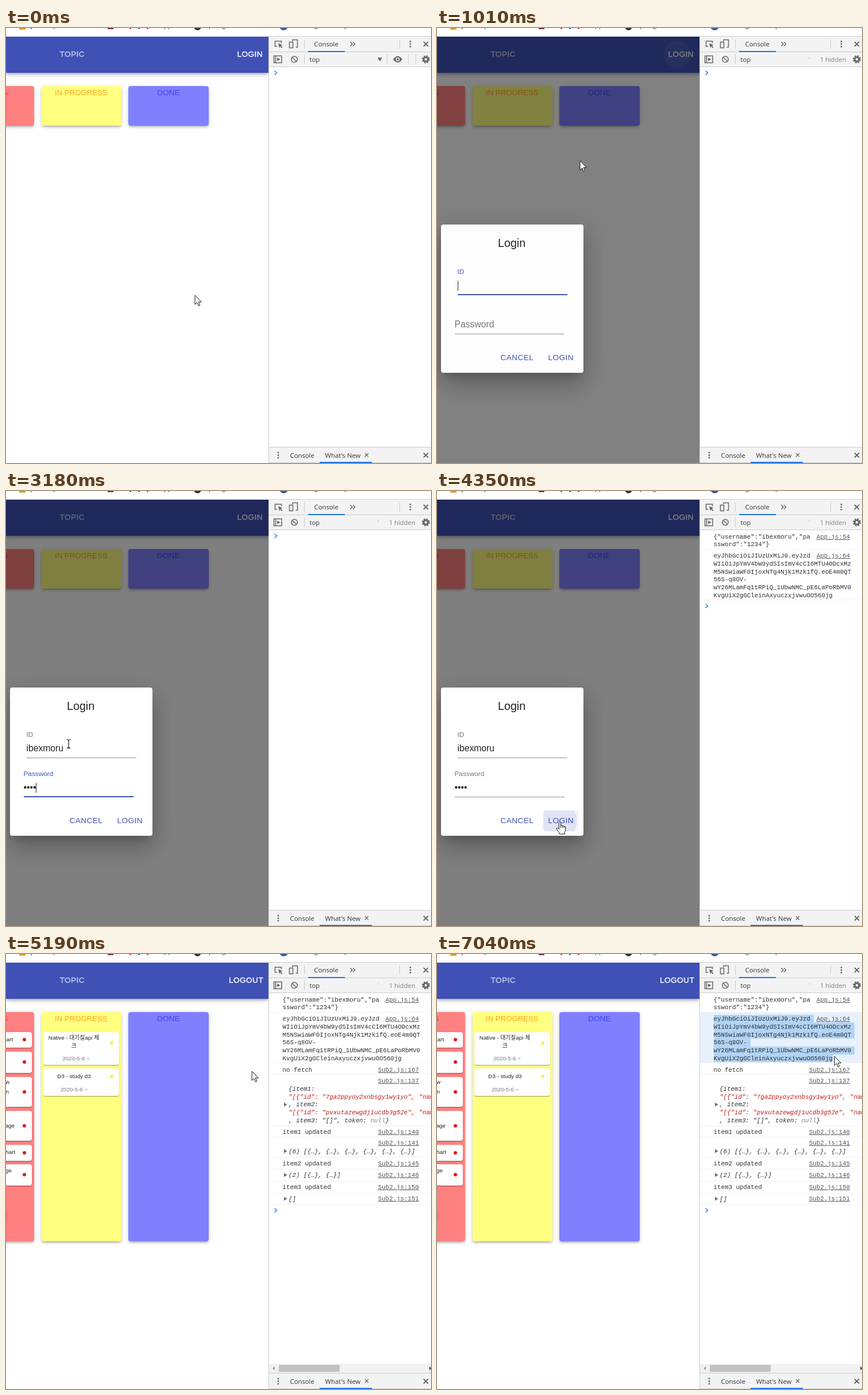
An HTML page for the animation above (8.53 s loop, 740 by 757 pixels).

```html
<!DOCTYPE html>
<html lang="en">
<head>
<meta charset="utf-8">
<title>Board login</title>
<style>
html, body { margin: 0; width: 100%; height: 100%; overflow: hidden; background: #fff; }
#stage { position: fixed; left: 0; top: 0; width: 740px; height: 757px; overflow: hidden;
  font-family: "Liberation Sans", Arial, "Noto Sans CJK KR", "Noto Sans CJK", sans-serif; }
#stage div { position: absolute; box-sizing: border-box; white-space: pre; line-height: 20px; }
#stage svg { position: absolute; left: 0; top: 0; overflow: visible; }
#stage .ui { font-family: "Open Sans", "Noto Sans", sans-serif; color: #333; }
#stage .mono { font: 10.8px/20px "Liberation Mono", "DejaVu Sans Mono", monospace; color: #303030; }
.btn { letter-spacing: .39px; }
.bar { color: #fff; -webkit-text-stroke: .35px #fff; }
.caret { display: inline-block; width: 1px; height: 17px; background: #222; vertical-align: -4px; }
u { color: #545454; }
em b { font-weight: 400; color: #c41a16; }
em s { text-decoration: none; color: #808080; }
</style>
</head>
<body>
<div id="stage"></div>
<script>
const LOOP = 8530, NAME = 'ibexmoru', INDIGO = '#3f51b5', GREY = '#757575';
const stage = document.getElementById('stage');

// ---------- builders ----------
function box(parent, x, y, w, h, css = '') {
  const d = document.createElement('div');
  d.style.cssText = `left:${x}px;top:${y}px;width:${w}px;height:${h}px;${css}`;
  parent.append(d);
  return d;
}
// text with its capitals centred on y
function txt(parent, x, y, html, size, css = '', cls = '') {
  const d = document.createElement('div');
  d.style.cssText = `left:${x}px;top:${y - 10}px;font-size:${size}px;${css}`;
  d.className = cls;
  d.innerHTML = html;
  parent.append(d);
  return d;
}
const layer = (parent, css) => box(parent, 0, 0, 740, 757, css);
const disc = (parent, x, y, r, color) => box(parent, x - r, y - r, 2 * r, 2 * r, `border-radius:50%;background:${color}`);
const show = (el, on) => { el.style.visibility = on ? 'visible' : 'hidden'; };

function svg(parent, html) {
  const s = document.createElementNS('http://www.w3.org/2000/svg', 'svg');
  s.setAttribute('width', 740);
  s.setAttribute('height', 757);
  s.innerHTML = html;
  parent.append(s);
  return s;
}

// ---------- bookmarks strip ----------
box(stage, 23, -8, 11, 11, 'background:#e0a030;border-radius:1px');
box(stage, 177, -4, 10, 6, 'background:#7a3038');
[[216, '#d33'], [231, '#36c'], [246, '#d33']].forEach(([x, c]) => disc(stage, x, 0, 1.5, c));
disc(stage, 333, -3, 6.5, '#333');
disc(stage, 483.5, -4, 7.5, '#3b5998');
[['j', 43], ['p', 82], ['pp', 275], ['p', 353], ['g', 376], ['g', 537], ['p', 589]]
  .forEach(([s, x]) => txt(stage, x, -5, s, 11.3, '', 'ui'));

// ---------- board page ----------
const page = box(stage, 0, 0, 457, 757, 'overflow:hidden;clip-path:inset(15px 0 0 0)');
box(page, 0, 15, 457, 63, `background:${INDIGO};box-shadow:0 2px 4px -1px rgba(0,0,0,.2),0 4px 5px rgba(0,0,0,.14),0 1px 10px rgba(0,0,0,.12)`);
txt(page, 93.5, 46, 'TOPIC', 13.7, 'opacity:.7', 'btn bar');
const ripple = disc(page, 418, 46, 24, '#fff');
const loginBtn = txt(page, 402.5, 46, 'LOGIN', 13.7, '', 'btn bar');
const logoutBtn = txt(page, 388, 46, 'LOGOUT', 13.7, '', 'btn bar');

const columns = [[-90, 139, '#ff8080'], [62, 139, '#ffff80'], [213, 140, '#8080ff']].map(([x, w, c]) =>
  box(page, x, 101, w, 69, `background:${c};border-radius:4px;overflow:hidden;box-shadow:0 3px 3px -2px rgba(0,0,0,.2),0 3px 4px rgba(0,0,0,.14),0 1px 8px rgba(0,0,0,.12)`));
txt(page, 3, 113, 'TODOS', 13.7, 'color:#e83a3a;transform:translateX(-100%)');
txt(page, 85, 113, 'IN PROGRESS', 13.2, 'color:#ffa520');
txt(page, 263, 113, 'DONE', 13.7, 'color:#4545f0');

const fab = box(page, -56, 180, 54, 54, 'border-radius:50%;background:#e03a4a;box-shadow:0 3px 5px -1px rgba(0,0,0,.2),0 6px 10px rgba(0,0,0,.2)');

const cards = box(page, 0, 0, 457, 757);
function card(x, y, w, h, dotX, dotY, color) {
  box(cards, x, y, w, h, 'background:#fff;border-radius:4px;box-shadow:0 2px 1px -1px rgba(0,0,0,.2),0 1px 1px rgba(0,0,0,.14),0 1px 3px rgba(0,0,0,.12)');
  disc(cards, dotX, dotY, 3, color);
}
[[136, 27, 149], [170, 37, 188], [214, 52, 240], [273, 52, 299], [332, 28, 346], [366, 37, 384]]
  .forEach(([y, h, d]) => card(-86, y, 131, h, 31.5, d, '#e01818'));
[['art', 12, 149], ['w', 6, 223], ['n', 5, 240], ['age', 15, 299], ['hart', 16, 345], ['ge', 10, 377]]
  .forEach(([s, x, y]) => txt(cards, x, y, s, 9.8, 'color:#222;transform:translateX(-100%)'));
card(65, 136, 132, 57, 184, 155, '#fff04a');
card(65, 199, 132, 48, 184, 213, '#fff04a');
[['Native - 대기질api 체', 146, '#222'], ['크', 160, '#222'], ['2020-5-6 ~', 182, '#777'],
 ['D3 - study d3', 213, '#222'], ['2020-5-6 ~', 235.5, '#777']]
  .forEach(([s, y, c], i) => txt(cards, i < 2 ? 118 : i === 2 ? 122 : 118.5, y, s, 9.8, `color:${c};transform:translateX(-50%)`));

// ---------- login dialog ----------
const backdrop = box(page, 0, 15, 457, 742, 'background:rgba(0,0,0,.5)');
const dialog = box(page, 0, 0, 457, 757);
box(dialog, 7, 342, 248, 258, 'background:#fff;border-radius:4px;box-shadow:0 11px 15px -7px rgba(0,0,0,.2),0 24px 38px 3px rgba(0,0,0,.14),0 9px 46px 8px rgba(0,0,0,.12)');
txt(dialog, 106, 373.5, 'Login', 19.7, 'color:#222');

function field(x, y, name) {
  box(dialog, x, y, 191, 1, 'background:#949494');
  const ink = box(dialog, x, y - 1, 191, 2, `background:${INDIGO}`);
  const label = txt(dialog, x - .5, y - 16, name, 15.7);
  const value = txt(dialog, x - .5, y - 16, '<span></span><span class="caret"></span>', 15.7, 'color:#222');
  const [text, caret] = value.children;
  return (s, lift, inkScale, focused, caretOn) => {
    ink.style.transform = `scaleX(${inkScale})`;
    label.style.fontSize = 15.7 - 3.9 * lift + 'px';
    label.style.top = y - 26 - 24 * lift + 'px';
    label.style.color = focused ? INDIGO : GREY;
    text.textContent = s;
    show(caret, caretOn);
  };
}
const idField = field(36, 464, 'ID');
const pwField = field(31, 532, 'Password');
const press = box(dialog, 185, 556, 62, 36, 'border-radius:4px;overflow:hidden;background:rgba(63,81,181,.06)');
const pressInk = disc(press, 28, 18, 31, 'rgba(63,81,181,.11)');
txt(dialog, 110.5, 574, 'CANCEL', 13.7, `color:${INDIGO}`, 'btn');
txt(dialog, 193.5, 574, 'LOGIN', 13.7, `color:${INDIGO}`, 'btn');

// ---------- developer tools ----------
const tools = layer(stage);
box(tools, 457, 14, 283, 743, 'background:#fff;border:solid #ccc;border-width:1px 0 0 1px');
box(tools, 458, 15, 282, 27, 'background:#f3f3f3;border-bottom:1px solid #ccc');
box(tools, 458, 42, 282, 26, 'background:#f3f3f3;border-bottom:1px solid #ccc');
box(tools, 458, 729, 282, 28, 'background:#f3f3f3;border:solid #ccc;border-width:1px 0');
box(tools, 526, 40, 64, 2, 'background:#1a73e8');
box(tools, 546, 755, 91, 2, 'background:#1a73e8');
[['Console', 536.5, 28], ['top', 528.5, 55], ['Console', 494.5, 744], ["What's New", 555.5, 744]]
  .forEach(([s, x, y]) => txt(tools, x, y, s, 11.3, '', 'ui'));

const cross = (x, y, r) => `M${x - r} ${y - r}l${2 * r} ${2 * r}m0 ${-2 * r}l${-2 * r} ${2 * r}`;
const dots = (x, y) => [-4.5, 0, 4.5].map(d => `<circle cx="${x}" cy="${y + d}" r="1.4"/>`).join('');
svg(tools, `<g fill="none" stroke="#666" stroke-width="1.5">
<path d="M472 32h-3.500v-9h11v3.500M499 23v-2.500h8.500v13h-3M493.500 24.500h6v10h-6z"/>
<path d="M466.500 48.500h13.500v12h-13.500zM469.500 49v11"/>
<circle cx="502" cy="54.500" r="5.200"/><path d="M498.300 50.800l7.400 7.400"/>
<path d="M599.500 24.500l3.500 3.500-3.500 3.500m4.500-7l3.500 3.500-3.500 3.500"/>
<path stroke-width="1.800" d="${cross(731, 28, 4)}${cross(731, 743.5, 4)}"/>
<path stroke-width="1.300" d="${cross(628, 743, 3)}"/>
<circle cx="731" cy="54.500" r="3.800" stroke-width="3"/>
<circle cx="731" cy="54.500" r="6" stroke-width="2" stroke-dasharray="2.700 2.010"/>
<path stroke="#ccc" stroke-width="1" d="M519.500 20v16M685.500 20v16M519.500 46v17"/></g>
<g fill="#666"><path d="M474 26.500l7.500 3-3 1.200 3 3-1.300 1.300-3-3-1.200 3zM472 51.500l5.500 3-5.500 3z"/>
${dots(704, 28)}${dots(474, 743.5)}</g>`);
const eye = svg(tools, `<path fill="#666" d="M647 51.500h8l-4 6.500z"/>
<path fill="#666" d="M674 54.500q8-11 16 0q-8 11-16 0z"/><circle cx="682" cy="54.500" r="3.400" fill="#f3f3f3"/>
<circle cx="682" cy="54.500" r="2" fill="#666"/>
<path stroke="#ccc" d="M663.500 46v17M700.500 46v17M713.500 46v17"/>`);
const hiddenNote = txt(tools, 667, 55, '1 hidden', 11.1, 'color:#808080', 'ui');
box(hiddenNote, -19, 6, 1, 2, 'background:#aaa');

// ---------- console ----------
const LEFT = 481.5, CH = 6.48, LH = 13.72;
const logs = [4260, 4340, 4420, 4640].map(at => ({ at, el: layer(tools) }));
const [logUser, logToken, logFetch, logData] = logs.map(l => l.el);
const line = (p, x, y, s) => txt(p, x, y + .6, s, 10.8, '', 'mono');
const link = (p, y, s) => line(p, 719 - s.length * CH, y, `<u>${s}</u>`);
const rule = (p, y) => box(p, 458, y, 282, 1, 'background:#f0f0f0');

line(logUser, LEFT, 79, `{"username":"${NAME}","pa`);
line(logUser, LEFT, 92.5, 'ssword":"1234"}');
link(logUser, 79, 'App.js:54');
rule(logUser, 101);

const token = ['eyJhbGciOiJIUzUxMiJ9.eyJzd', 'WIiOiJpYmV4bW9ydSIsImV4cCI6MTU4ODcxMz',
  'M5NSwiaWF0IjoxNTg4Njk1Mzk1fQ.eoE4m0QT', '56S-q8GV-',
  'wY26MLamFq1tRPiQ_1UbwNMC_pE6LaPoRbMV0', 'KvgUiX2gGCleinAxyuczxjvwuOO560jg'];
const focusRow = box(logToken, 458, 102, 282, 87, 'background:#e8f0fc');
const marks = token.map((s, i) => box(logToken, LEFT, 105.7 + i * LH, 0, LH + .3, 'background:#b0d4f7'));
token.forEach((s, i) => line(logToken, LEFT, 112.5 + i * LH, s));
link(logToken, 112.5, 'App.js:64');
rule(logToken, 189);

line(logFetch, LEFT, 201, 'no fetch');
link(logFetch, 201, 'Sub2.js:167');
rule(logFetch, 208);

[['137', 220], ['140', 309], ['141', 328.5], ['145', 364], ['146', 384.5], ['150', 405.5], ['151', 425.5]]
  .forEach(([n, y]) => link(logData, y, 'Sub2.js:' + n));
[1, 2, 3].forEach((n, i) => line(logData, LEFT, [309, 364, 405.5][i], `item${n} updated`));
const objs = n => `[${Array(n).fill('{…}').join(', ')}]`;
[['{item1:', 234.5], ['<b>"[{"id": "7ga2ppyoy2xnbsgy1wy1yo", "name"</b>', 248], [', item2:', 261.5],
 ['<b>"[{"id": "pvxutazewgdj1ucdb3g52e", "name"</b>', 275.5], [', item3: "[]", token: <s>null</s>}', 289],
 ['(6) ' + objs(6), 343], ['(2) ' + objs(2), 384.5], ['[]', 426]]
  .forEach(([s, y]) => line(logData, 492, y, `<em>${s}</em>`));
[299, 318, 353, 374, 395, 416, 435].forEach(y => rule(logData, y));
svg(logData, [262, 343, 384.5, 426].map(y => `<path fill="#6e6e6e" d="M484 ${y - 3.5}l5.500 3.500-5.500 3.500z"/>`).join(''));
box(logData, 458, 713, 282, 16, 'background:#f1f1f1');
box(logData, 475, 715, 106, 12, 'background:#c1c1c1');
svg(logData, '<path fill="#a0a0a0" d="M468 717.500v7l-4-3.500z"/><path fill="#505050" d="M737 717.500v7l4-3.500z"/>');
const prompt = svg(tools, '<path fill="none" stroke="#367cf1" stroke-width="1.600" d="M467.500 -3.500l4 3.500-4 3.500"/>');

// ---------- pointer ----------
const halo = disc(stage, 0, 0, 11.5, 'rgba(238,222,30,.75)');
const pointer = svg(stage, `<g fill="#fff" stroke="#111" stroke-linejoin="round">
<path d="M0 0V16L3.700 12.600L6.200 18.600L8.600 17.600L6.100 11.700H11.300Z"/>
<path d="M-1.600 1.500Q0 -1 1.500 1.500V7Q4 5.600 4.400 7.800Q6.600 6.600 7.200 8.600Q9.800 8 9.800 10.500V14Q9.800 17 8.300 18.500V22H-.8V20L-5.600 13.500Q-6.400 11.400 -4.200 11L-1.600 13.500ZM1.500 7V11M4.400 8V11.500M7.200 8.600V11.500"/>
<path fill="none" stroke-width="1.200" d="M-3.500 -7.500Q0 -7.500 0 -5.500Q0 -7.500 3.500 -7.500M0 -6V6M-3.500 7.500Q0 7.500 0 5.500Q0 7.500 3.500 7.500"/></g>`);
const shapes = [...pointer.querySelectorAll('path')];
const ARROW = 0, HAND = 1, BEAM = 2;
const track = [
  [0, 329, 465, ARROW], [90, 329, 465, ARROW], [530, 437, 42, HAND], [690, 437, 42, HAND],
  [780, 405, 62, ARROW], [870, 349, 107, ARROW], [1240, 80, 441, BEAM], [1550, 80, 440, BEAM],
  [1640, 80, 440, BEAM], [1720, 109, 440, BEAM], [3600, 109, 440, BEAM], [3736, 120, 455, ARROW],
  [4118, 214, 575, HAND], [4350, 214, 575, HAND], [4500, 217, 574.5, HAND], [4656, 240, 540, ARROW],
  [5340, 482, 108, ARROW], [5600, 482, 108, ARROW], [5970, 522, 163, ARROW], [6430, 706, 173, ARROW],
  [6580, 706, 173, ARROW], [6740, 692, 178, ARROW], [LOOP, 692, 178, ARROW]];

// ---------- timing ----------
// bursts of screen updates: first, last, count
const bursts = [[150, 530, 6], [690, 870, 3], [930, 1240, 5], [1390, 1550, 3], [1720, 1720, 1], [1870, 1870, 1],
  [2170, 2250, 2], [2480, 3030, 8], [3180, 3180, 1], [3660, 4500, 12], [4580, 5340, 11],
  [5670, 5970, 5], [6050, 6430, 6], [6660, 6740, 2], [7040, 7040, 1]];
function snap(t) {
  let s = 0;
  for (const [a, b, n] of bursts) {
    if (t < a) break;
    const step = (b - a) / (n - 1) || 1;
    s = a + step * Math.min(n - 1, Math.floor((t - a) / step + .01));
  }
  return s;
}
const clamp = v => Math.max(0, Math.min(1, v));
const bezier = (x1, y1, x2, y2) => x => {
  const at = (a, b, s) => 3 * (1 - s) * (1 - s) * s * a + 3 * (1 - s) * s * s * b + s ** 3;
  let lo = 0, hi = 1;
  for (let i = 0; i < 20; i++) {
    const m = (lo + hi) / 2;
    if (at(x1, x2, m) < x) lo = m; else hi = m;
  }
  return at(y1, y2, lo);
};
const standard = bezier(.4, 0, .2, 1), decel = bezier(0, 0, .2, 1);
const ramp = (t, start, dur, ease) => ease(clamp((t - start) / dur));
const count = (times, t) => times.filter(k => k <= t).length;
const idKeys = [2160, 2165, 2245, 2475, 2550, 2630, 2710, 2790];
const pwKeys = [2940, 2945, 3025, 3175];
const ID_FOCUS = 818, PW_FOCUS = 2830, SUBMIT = 4260;

function pointerAt(t) {
  const i = Math.max(1, track.findIndex(k => k[0] > t));
  const [t0, x0, y0, shape] = track[i - 1], [t1, x1, y1] = track[i];
  const p = (t - t0) / (t1 - t0);
  return [x0 + (x1 - x0) * p, y0 + (y1 - y0) * p, shape];
}

function drawSelection(t, x, y) {
  const on = t >= 5660;
  const row = Math.max(0, Math.min(5, Math.floor((y - 105.7) / LH)));
  show(focusRow, on && t >= SUBMIT);
  if (!on) show(focusRow, false);
  marks.forEach((m, i) => {
    const full = token[i].length * CH;
    let w = 0;
    if (on && i < row) w = full + 6;
    if (on && i === row) w = Math.max(0, Math.min(full, Math.round((x - LEFT) / CH) * CH));
    m.style.width = w + 'px';
  });
}

function render(t) {
  const fade = ramp(t, 818, 225, standard) * (1 - ramp(t, 4344, 195, standard));
  backdrop.style.opacity = dialog.style.opacity = fade;
  ripple.style.transform = `scale(${ramp(t, 680, 150, decel)})`;
  ripple.style.opacity = .2 * (1 - clamp((t - 870) / 200));

  const inId = t >= ID_FOCUS && t < PW_FOCUS, inPw = t >= PW_FOCUS && t < SUBMIT;
  const idUp = ramp(t, ID_FOCUS, 200, decel), pwUp = ramp(t, PW_FOCUS, 200, decel);
  idField(NAME.slice(0, count(idKeys, t)), idUp, idUp * (1 - pwUp), inId, inId && !(t >= 1390 && t < 1870));
  pwField('•'.repeat(count(pwKeys, t)), pwUp, pwUp * (1 - ramp(t, SUBMIT, 80, decel)), inPw, inPw);
  press.style.opacity = clamp((t - 4040) / 150);
  pressInk.style.transform = `scale(${ramp(t, 4200, 147, decel)})`;

  const logged = t >= 4420, loaded = t >= 4640;
  const height = loaded ? 399 : logged ? 156 : 69;
  columns.forEach(c => { c.style.height = height + 'px'; });
  fab.style.top = 101 + height - 77 + 'px';
  show(fab, logged);
  show(cards, loaded);
  show(loginBtn, !logged);
  show(logoutBtn, logged);

  show(eye, t < 1000);
  show(hiddenNote, t >= 1000);
  logs.forEach(l => { l.el.style.display = t >= l.at ? 'block' : 'none'; });
  prompt.style.top = [77.5, 111, 199.5, 219, 445.5][logs.filter(l => t >= l.at).length] + 'px';

  const [x, y, shape] = pointerAt(t);
  drawSelection(t, x, y);
  pointer.style.transform = `translate(${x}px,${y}px)`;
  shapes.forEach((s, i) => show(s, i === shape));
  halo.style.transform = `translate(${x}px,${y}px)`;
  show(halo, t >= 5660 && t < 7030);
}

const start = performance.now();
function tick() {
  render(snap((performance.now() - start) % LOOP));
  requestAnimationFrame(tick);
}
tick();
</script>
</body>
</html>
```
